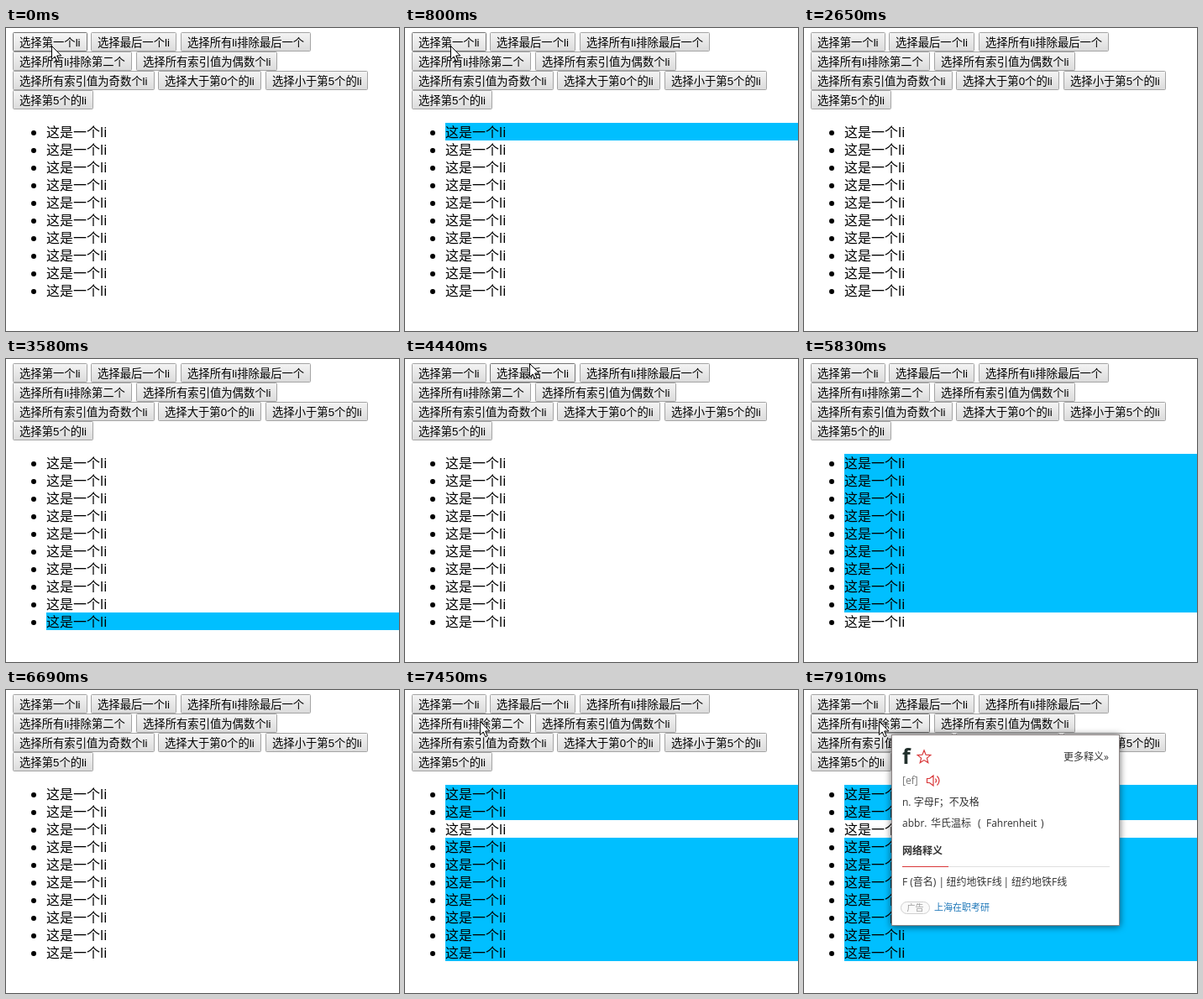
Animation of 468 by 361 pixels, one loop 8 s. Source, as an HTML page:

```html
<!DOCTYPE html>
<html lang="zh-CN">
<head>
<meta charset="utf-8">
<style>
  html, body { margin: 0; width: 100%; height: 100%; overflow: hidden; background: #fff; }
  svg { display: block; width: 468px; height: 361px; }
  text { white-space: pre; }
  .btn text { font: 13.333px "Liberation Sans", "Noto Sans CJK SC", "Noto Sans CJK", sans-serif; }
  .btn rect { fill: url(#up); stroke: #a4a4a4; }
  .btn.hover rect { fill: url(#over); stroke: #747474; }
  .btn.press rect { fill: url(#down); stroke: #b4b4b4; }
  .item text { font: 16px "Noto Sans", "Noto Sans CJK SC", "Noto Sans CJK", sans-serif; }
  .item rect { fill: #00bfff; visibility: hidden; }
  .item.lit rect { visibility: visible; }
  #popup { font: 12px "Open Sans", "Noto Sans CJK SC", "Noto Sans CJK", sans-serif; fill: #333; }
  #panel { filter: drop-shadow(0 1px 4px rgba(0, 0, 0, .6)); }
  .red { fill: none; stroke: #d9383a; stroke-width: 1.2; }
</style>
</head>
<body>
<svg viewBox="0 0 468 361">
  <defs>
    <linearGradient id="up" x2="0" y2="1"><stop stop-color="#f4f4f4"/><stop offset="1" stop-color="#dbdbdb"/></linearGradient>
    <linearGradient id="over" x2="0" y2="1"><stop stop-color="#f8f8f8"/><stop offset="1" stop-color="#e0e0e0"/></linearGradient>
    <linearGradient id="down" x2="0" y2="1"><stop stop-color="#dcdcdc"/><stop offset="1" stop-color="#f4f4f4"/></linearGradient>
  </defs>
  <g id="buttons"></g>
  <g id="list"></g>
  <g id="popup">
    <rect id="panel" x="104.5" y="53.5" width="271" height="227" fill="#fff" stroke="#8c8484"/>
    <text x="117" y="88" font-size="25" font-weight="700" fill="#22302c">f</text>
    <path id="star" class="red"/>
    <text x="309" y="84">更多释义»</text>
    <text x="117" y="112" fill="#777">[ef]</text>
    <path class="red" d="M146.5 105.5h3l4.5-3.5v12l-4.5-3.5h-3zM156.5 105.5q2 2.5 0 5M158.5 102.5q5 5.5 0 11"/>
    <text x="117" y="138">n. 字母F；不及格</text>
    <text y="163"><tspan x="117">abbr.</tspan><tspan x="151">华氏温标</tspan><tspan x="207">(</tspan><tspan x="217">Fahrenheit</tspan><tspan x="282">)</tspan></text>
    <text x="117" y="196" font-weight="700">网络释义</text>
    <path d="M117 210.5H364" stroke="#e0e0e0"/>
    <path d="M117 210.5H172" stroke="#d9383a"/>
    <text y="233"><tspan x="117">F (音名)</tspan><tspan x="160.5">|</tspan><tspan x="169.5">纽约地铁F线</tspan><tspan x="237.5">|</tspan><tspan x="247">纽约地铁F线</tspan></text>
    <rect x="115.5" y="252.5" width="34" height="14" rx="7" fill="#fafafa" stroke="#d0d0d0"/>
    <text x="122.5" y="263" font-size="10" fill="#999">广告</text>
    <text x="155" y="263" font-size="11" fill="#1c76b8">上海在职考研</text>
  </g>
  <path id="cursor" d="M.5 .5V16.5L4.2 13 6.8 18.7 9.2 17.7 6.7 12H11.8z" fill="#fff" stroke="#000" stroke-linejoin="round"/>
</svg>
<script>
const $ = id => document.getElementById(id);
const LOOP = 8000, BUTTON_H = 23, LINE_H = 21;

// left, top, right, label
const BUTTONS = [
  [8, 5, 97, '选择第一个li'],
  [101, 5, 203, '选择最后一个li'],
  [208, 5, 363, '选择所有li排除最后一个'],
  [8, 28, 150, '选择所有li排除第二个'],
  [155, 28, 323, '选择所有索引值为偶数个li'],
  [8, 51, 177, '选择所有索引值为奇数个li'],
  [181, 51, 304, '选择大于第0个的li'],
  [309, 51, 431, '选择小于第5个的li'],
  [8, 74, 104, '选择第5个的li']
];

const none = () => false;
const first = i => i === 0;
const last = i => i === 9;
const notLast = i => i !== 9;
const notThird = i => i !== 2;

// Each step changes only what it names; at: null hides the pointer.
const STEPS = [
  { t: 0, at: [54, 21], lit: none, press: false, popup: false },
  { t: 700, press: true },
  { t: 800, press: false, lit: first },
  { t: 1790, at: null },
  { t: 2650, lit: none },
  { t: 2730, at: [146, 9] },
  { t: 2800, at: [130, 13] },
  { t: 3030, press: true },
  { t: 3100, press: false, lit: last },
  { t: 3500, at: null },
  { t: 4290, lit: none },
  { t: 4370, at: [130, 11] },
  { t: 4440, at: [148, 5] },
  { t: 4520, at: [168, 1] },
  { t: 4600, at: [186, 0] },
  { t: 4670, at: [200, 3] },
  { t: 4750, at: [209, 7] },
  { t: 4820, at: [214, 10] },
  { t: 4900, at: [217, 12] },
  { t: 5130, press: true },
  { t: 5210, press: false, lit: notLast },
  { t: 5590, at: [208, 9] },
  { t: 5670, at: [190, 6] },
  { t: 5750, at: [166, 1] },
  { t: 5830, at: null },
  { t: 6690, lit: none },
  { t: 6770, at: [150, 9] },
  { t: 6850, at: [128, 16] },
  { t: 6940, at: [108, 25] },
  { t: 7030, at: [95, 33] },
  { t: 7130, at: [89, 37] },
  { t: 7280, press: true },
  { t: 7450, press: false, lit: notThird },
  { t: 7910, popup: true }
];

function add(parent, tag, attrs, text = '') {
  const node = document.createElementNS('http://www.w3.org/2000/svg', tag);
  for (const key in attrs) node.setAttribute(key, attrs[key]);
  node.textContent = text;
  return parent.appendChild(node);
}

const buttons = BUTTONS.map(([x, y, right, label]) => {
  const g = add($('buttons'), 'g', { class: 'btn' });
  add(g, 'rect', { x: x + .5, y: y + .5, width: right - x - 1, height: BUTTON_H - 1, rx: 1 });
  add(g, 'text', { x: x + 8, y: y + 17 }, label);
  return g;
});

const items = Array.from({ length: 10 }, (_, i) => {
  const y = 113 + i * LINE_H;
  const g = add($('list'), 'g', { class: 'item' });
  add(g, 'rect', { x: 48, y, width: 420, height: LINE_H });
  add(g, 'circle', { cx: 33, cy: y + 12, r: 3 });
  add(g, 'text', { x: 48, y: y + 17 }, '这是一个li');
  return g;
});

const starPoints = Array.from({ length: 10 }, (_, i) => {
  const r = i % 2 ? 3.6 : 8.2, a = i * Math.PI / 5;
  return [143 + r * Math.sin(a), 80 - r * Math.cos(a)].map(v => v.toFixed(1));
});
$('star').setAttribute('d', 'M' + starPoints.join('L') + 'z');

function render(time) {
  const { at, lit, press, popup } = Object.assign({}, ...STEPS.filter(s => s.t <= time));
  buttons.forEach((g, i) => {
    const [x, y, right] = BUTTONS[i];
    const over = at && at[0] >= x && at[0] < right && at[1] >= y && at[1] < y + BUTTON_H;
    g.classList.toggle('hover', !!over && !press);
    g.classList.toggle('press', !!over && press);
  });
  items.forEach((g, i) => g.classList.toggle('lit', lit(i)));
  $('popup').style.display = popup ? '' : 'none';
  $('cursor').style.display = at ? '' : 'none';
  if (at) $('cursor').setAttribute('transform', `translate(${at})`);
}

const start = performance.now();
function tick() {
  render((performance.now() - start) % LOOP);
  requestAnimationFrame(tick);
}
tick();
</script>
</body>
</html>
```
